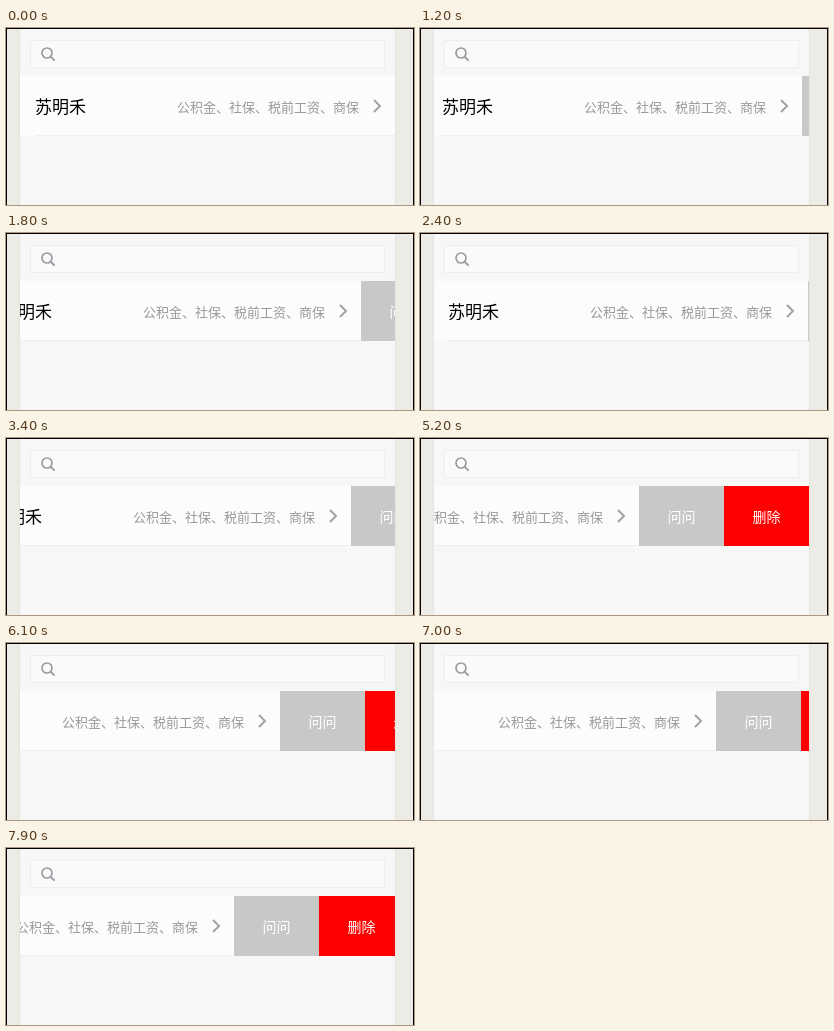
Recreate the animation shown at these times as an HTML page. Size 408x177 px, loop 8 s.

```html
<!DOCTYPE html>
<html lang="zh-CN">
<head>
<meta charset="utf-8">
<title>滑动操作</title>
<style>
  html, body { margin: 0; width: 100%; height: 100%; overflow: hidden; background: #edebe6; }
  body { position: relative; font-family: "Noto Sans CJK SC", "Noto Sans CJK", sans-serif; }
  .frame {
    position: absolute; left: 0; top: 0; width: 408px; height: 177px; box-sizing: border-box;
    border: solid #000; border-width: 1px 1px 0; pointer-events: none;
  }
  .phone {
    position: absolute; left: 14px; top: 0; width: 375px; height: 177px;
    background: #f7f7f7; box-shadow: 0 0 0 1px #e6e4df; overflow: hidden;
  }
  .search {
    position: absolute; left: 10px; top: 12px; width: 355px; height: 28px; box-sizing: border-box;
    background: #fafafa; border: 1px solid #eeeeee;
  }
  svg { position: absolute; fill: none; }
  .row {
    position: absolute; left: 0; top: 48px; width: 545px; height: 60px;
    line-height: 60px; white-space: nowrap;
  }
  .row > * { position: absolute; top: 0; height: 60px; }
  .cell { left: 0; width: 375px; background: #fcfcfc; }
  .cell::after {
    content: ""; position: absolute; left: 15px; right: 0; bottom: 0; height: 1px; background: #f0f0f0;
  }
  .cell span { position: absolute; top: 0; }
  .cell .name { left: 15px; font-size: 17px; color: #000; }
  .cell .info { left: 157px; top: 1px; font-size: 13px; color: #999; }
  .btn { width: 85px; text-align: center; font-size: 14px; color: #fff; }
  .ask { left: 375px; background: #c8c8c8; }
  .del { left: 460px; background: #f00; }
</style>
</head>
<body>
<div class="phone">
  <div class="search">
    <svg width="20" height="20" style="left:8px;top:4px" stroke="#999ca2" stroke-width="1.7">
      <circle cx="8" cy="8" r="5"/>
      <path d="M11.6 11.6 15.6 15.6" stroke-width="2"/>
    </svg>
  </div>
  <div class="row" id="row">
    <div class="cell">
      <span class="name">苏明禾</span>
      <span class="info">公积金、社保、税前工资、商保</span>
      <svg width="14" height="18" style="left:350px;top:21px" stroke="#a3a3a3" stroke-width="2">
        <path d="M4 3 10 9 4 15"/>
      </svg>
    </div>
    <div class="btn ask">问问</div>
    <div class="btn del">删除</div>
  </div>
</div>
<div class="frame"></div>
<script>
  const LOOP = 8000, TICK = 100;

  const linear = u => u;
  const drag = u => Math.sin(u * Math.PI / 2);
  const brake = u => 1 - (1 - u) ** 3;
  const settle = u => 1 - (1 - u ** 1.4) ** 3.2; // close to CSS "ease"

  // Finger drags and the snaps after release; "to" is the left shift in px.
  const moves = [
    { start: 1150, end: 1400, to: 36, ease: linear },
    { start: 1750, end: 2650, to: 0, ease: settle },
    { start: 3275, end: 3900, to: 143, ease: drag },
    { start: 4150, end: 5200, to: 170, ease: settle },
    { start: 5810, end: 6700, to: 91, ease: brake },
    { start: 6950, end: 7200, to: 102, ease: linear },
    { start: 7300, end: 7400, to: 104, ease: linear },
    { start: 7550, end: 8000, to: 165, ease: drag }
  ];

  function shiftAt(t) {
    let x = 0;
    for (const { start, end, to, ease } of moves) {
      if (t <= start) break;
      x += (to - x) * ease(Math.min(1, (t - start) / (end - start)));
    }
    return Math.round(x);
  }

  // The row moves in whole ticks, holding still between them.
  const frames = [];
  for (let t = 0; t <= LOOP; t += TICK) {
    frames.push({
      offset: t / LOOP,
      transform: `translateX(${-shiftAt(t)}px)`,
      easing: "steps(1, end)"
    });
  }

  document.getElementById("row").animate(frames, { duration: LOOP, iterations: Infinity });
</script>
</body>
</html>
```
